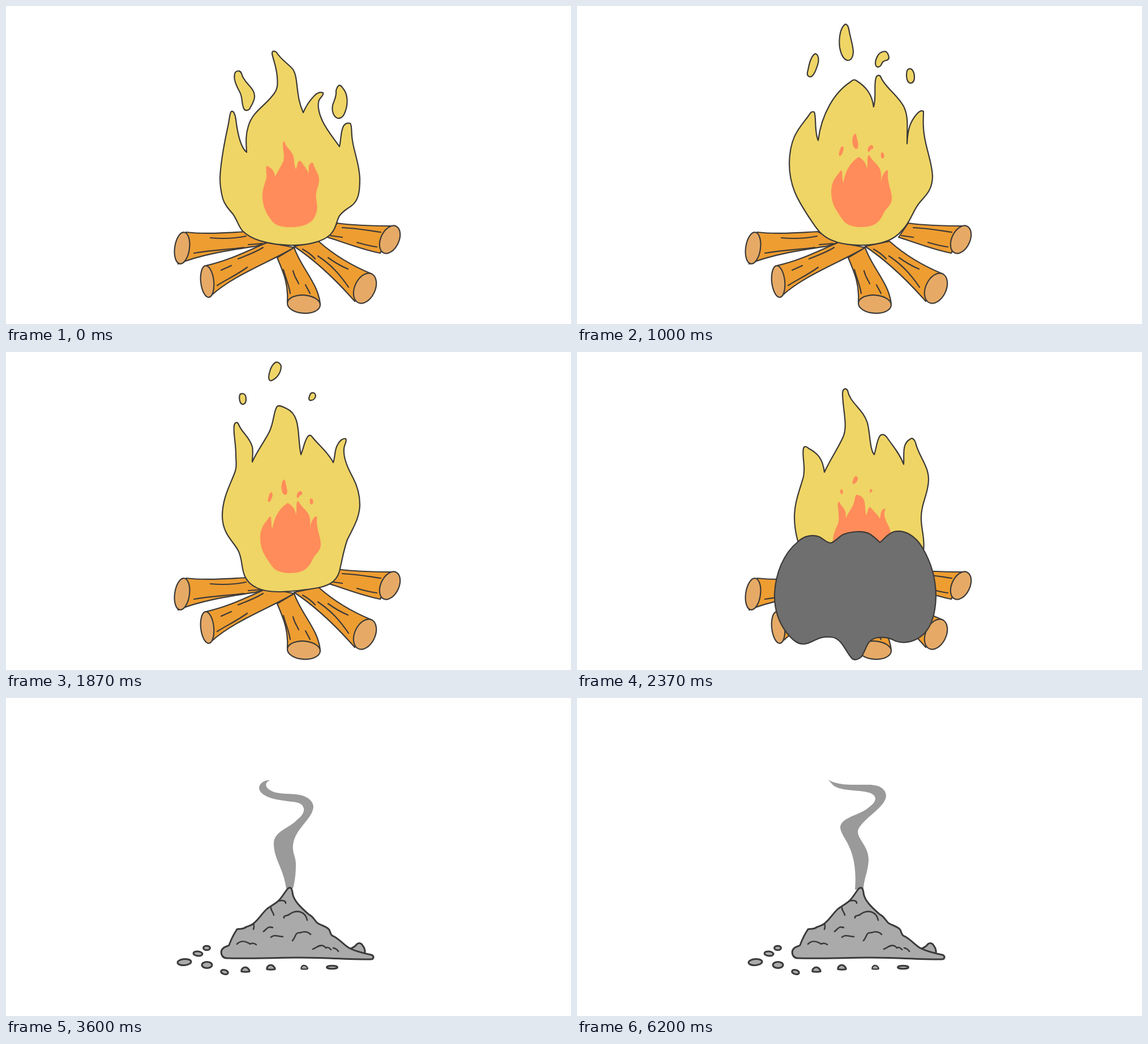
An HTML page without scripts that plays this animation: 998x561 px, repeating every 6.31 s.

```html
<!DOCTYPE html>
<html lang="en">
<head>
<meta charset="utf-8">
<title>Campfire to ash</title>
<style>
html, body { margin: 0; width: 100%; height: 100%; overflow: hidden; background: #fff; }
svg { display: block; width: 998px; height: 561px; overflow: hidden; }
.ink { stroke: #3c3a38; stroke-width: 2.2; stroke-linejoin: round; stroke-linecap: round; }
.fire, .ash, .strip, .puff, .smoke, .bit { animation: 6310ms linear infinite; }
.fire { animation-name: burn; animation-timing-function: step-end; }
.ash { animation-name: remain; animation-timing-function: step-end; }
.strip { animation-name: flicker; animation-timing-function: step-end; }
.inner .strip { animation-delay: -6279ms; }
.outer { fill: #efd565; }
.inner { fill: #ff8c5a; }
.wood { fill: #ee9d31; }
.cut { fill: #e6aa66; }
.line { fill: none; }
.heap { fill: #aaa; stroke: #3a3a3a; stroke-width: 3; stroke-linejoin: round; stroke-linecap: round; }
.cloud { fill: #6f6f6f; }
.cloud path { vector-effect: non-scaling-stroke; }
.puff { animation-name: puff; transform-origin: 491px 430px; }
.bit { animation-name: scatter; transform-origin: 491px 430px; }
.smoke { animation-name: drift; fill: #9a9a9a; }

@keyframes burn { 0% { visibility: visible } 39.7%, 100% { visibility: hidden } }
@keyframes remain { 0% { visibility: hidden } 39.7%, 100% { visibility: visible } }

/* The four flame poses stand side by side and slide into view */
@keyframes flicker {
  0%, 6.53%, 13.06%, 19.59%, 26.12%, 32.65%, 39.18% { transform: translateX(0) }
  1.63%, 8.16%, 14.69%, 21.22%, 27.75%, 34.28% { transform: translateX(-3000px) }
  3.26%, 9.79%, 16.32%, 22.85%, 29.38%, 35.91% { transform: translateX(-6000px) }
  4.9%, 11.43%, 17.95%, 24.48%, 31.01%, 37.54%, 99%, 100% { transform: translateX(-9000px) }
}
@keyframes puff {
  0%, 36.4% { transform: scale(.5); visibility: hidden }
  36.45% { transform: scale(.55); visibility: visible }
  37.5%, 38.05% { transform: none; visibility: visible }
  39.6%, 40.6% { transform: translate(8px, -140px) scale(2.05, 1.39); visibility: visible }
  40.65%, 100% { transform: translate(8px, -140px) scale(2.05, 1.39); visibility: hidden }
}
@keyframes scatter {
  0%, 40.6% { transform: scale(1); visibility: hidden }
  40.65% { transform: scale(1); visibility: visible }
  44% { transform: scale(.1); visibility: visible }
  44.1%, 100% { transform: scale(.1); visibility: hidden }
}
@keyframes drift {
  0%, 38.03%, 54.36%, 57.05%, 73.38%, 76.07%, 92.39%, 95.09% {
    d: path("M495,336 C490,300 473,285 473,256 C474,235 500,230 513,216 C523,208 527,202 526,195 C523,182 507,184 490,181 C465,178 447,170 447,158 C448,150 457,144 467,145 C458,148 458,155 462,159 C473,170 490,168 511,170 C530,171 543,181 543,192 C541,215 510,230 507,260 C506,275 512,280 512,294 C512,310 510,325 507,336Z") }
  40.1%, 59.11%, 78.13%, 97.15% {
    d: path("M491,338 C491,270 468,258 467,236 C468,222 495,213 509,203 C520,195 527,188 527,181 C525,169 505,169 485,168 C463,167 450,161 446,154 C444,150 444,147 446,146 C447,151 452,153 459,154 C473,158 490,156 510,156 C532,156 544,165 544,180 C541,200 500,220 499,243 C500,258 512,265 513,285 C513,305 507,320 506,338Z") }
  41.2%, 60.22%, 79.24%, 98.26%, 100% {
    d: path("M491,338 C497,262 466,248 465,228 C466,212 495,207 510,197 C521,189 527,184 527,177 C525,165 507,165 487,163 C465,161 455,158 449,150 C446,147 445,145 444,144 C448,147 453,149 459,150 C473,154 490,153 512,153 C535,152 546,161 546,173 C544,195 500,215 496,235 C496,250 514,260 515,284 C515,305 506,320 506,338Z") }
  47.54%, 48.65%, 66.56%, 67.67%, 85.58%, 86.69% {
    d: path("M493,338 C497,258 470,240 471,218 C473,203 500,200 514,191 C527,184 533,178 533,171 C531,160 511,160 491,157 C470,155 458,152 452,146 C449,144 448,143 447,142 C452,143 457,145 463,146 C477,149 496,147 518,146 C542,146 554,155 554,167 C550,188 505,205 502,226 C502,243 518,255 518,280 C517,305 507,320 506,338Z") }
}
</style>
</head>
<body>
<svg viewBox="0 0 998 561" xmlns="http://www.w3.org/2000/svg">
<defs>
  <g id="poses">
    <g>
      <path d="M502,422 C460,421 432,411 418,397 C410,388 408,376 400,366 C393,358 386,350 383,340 C379,325 378,316 378,304 C379,275 385,245 391,217 C395,200 395,188 398,186 C402,184 405,192 406,200 C409,225 415,250 425,258 C424,240 423,228 428,212 C436,186 455,178 470,159 C481,147 480,137 479,125 C478,108 472,95 470,84 C470,78 475,79 478,82 C486,95 500,103 507,112 C517,128 511,158 525,188 C530,176 538,165 545,158 C551,152 557,152 560,153 C562,157 556,160 553,166 C549,178 554,192 559,203 C567,220 581,236 589,248 C592,235 591,222 596,212 C599,207 604,206 608,207 C611,210 610,220 611,230 C613,255 624,275 625,305 C625,330 622,343 611,352 C602,358 592,364 588,372 C584,380 583,390 577,398 C567,414 535,423 502,422Z"/>
      <path d="M405,117 C409,113 414,114 416,119 C420,137 440,143 439,161 C438,170 433,176 430,182 C427,185 422,185 420,181 C415,169 419,162 412,150 C407,141 400,127 405,117Z"/>
      <path d="M587,141 C590,138 593,142 595,145 C604,155 604,172 600,184 C597,194 592,199 586,198 C579,196 575,186 577,175 C580,165 584,160 583,150 Q584,144 587,141Z"/>
    </g>
    <g transform="translate(3000)">
      <path d="M502,422 C470,422 445,415 430,400 C422,392 415,380 408,370 C392,345 375,320 375,277 C376,230 393,215 408,195 C412,189 414,185 419,187 C423,195 419,222 426,237 C432,190 455,152 483,134 C487,130 490,129 494,132 C510,142 521,155 524,178 C529,160 524,140 528,127 C530,121 535,121 537,126 C543,142 566,157 577,177 C586,195 583,215 583,243 C584,215 590,203 599,192 C603,187 608,183 612,186 C612,200 610,210 614,232 C618,256 628,280 628,302 C627,325 617,333 605,347 C592,363 590,380 574,396 C560,413 535,422 502,422Z"/>
      <path d="M421,84 C427,86 428,96 425,104 C422,113 419,122 413,125 C406,125 406,119 408,113 C410,103 413,88 421,84Z"/>
      <path d="M474,32 C480,33 480,42 482,50 C485,64 488,72 488,82 C487,92 484,96 478,96 C470,94 466,84 464,73 C462,57 465,38 474,32Z"/>
      <path d="M529,92 C532,84 538,80 545,80 C549,82 551,88 551,92 C549,97 545,95 541,98 C537,101 539,105 534,107 C526,110 526,100 529,92Z"/>
      <path d="M586,111 C592,109 596,117 596,125 C596,132 594,136 589,136 C584,136 582,128 582,122 C582,117 583,112 586,111Z"/>
    </g>
    <g transform="translate(6000)">
      <path d="M480,423 C450,423 430,413 422,396 C415,380 418,365 410,350 C401,333 383,322 382,290 C382,260 394,238 402,218 C409,203 406,195 406,180 C406,160 401,143 403,129 C405,123 409,123 411,128 C417,143 429,148 435,167 C437,178 435,185 435,194 C443,175 458,156 466,139 C474,120 473,103 479,96 C483,93 490,97 496,100 C522,112 514,150 521,181 C527,166 527,156 534,148 C537,146 539,147 541,150 C551,163 570,178 578,195 C582,183 580,172 586,163 C591,154 597,152 600,153 C603,157 598,162 597,170 C595,188 606,209 613,222 C621,237 625,252 625,270 C624,295 612,312 603,331 C597,347 594,365 589,387 C583,408 565,414 545,417 C525,420 505,423 480,423Z"/>
      <path d="M475,19 C479,16 484,19 486,25 C486,36 479,46 470,50 C463,53 463,43 466,34 C468,27 471,22 475,19Z"/>
      <path d="M414,74 C420,72 424,75 424,83 C424,90 421,93 417,92 C412,90 411,78 414,74Z"/>
      <path d="M540,72 C544,71 547,74 547,77 C546,82 543,85 540,85 C535,87 534,82 536,78 C537,74 538,73 540,72Z"/>
    </g>
    <path transform="translate(9000)" d="M498,422 C465,422 440,415 427,400 C415,385 385,350 384,292 C384,265 393,245 400,220 C404,200 397,185 400,170 C402,165 406,167 409,170 C424,178 434,187 437,212 C447,190 460,172 470,150 C479,130 469,100 469,72 C470,64 475,63 478,68 C482,90 505,100 513,125 C518,145 517,172 525,181 C530,165 529,158 535,148 C538,144 543,145 547,150 C557,165 569,177 577,198 C578,180 574,162 588,154 C592,150 596,154 598,160 C603,183 621,200 621,225 C621,250 607,268 608,295 C608,313 615,330 612,350 C607,378 595,395 583,402 C560,418 530,423 498,422Z"/>
  </g>
  <path id="blob" d="M390,335 C400,325 415,321 428,326 C436,330 440,336 448,337 C456,335 462,326 470,322 C485,316 505,315 517,321 C525,326 530,331 535,336 C543,330 549,320 560,317 C580,313 598,325 610,345 C625,370 634,400 634,432 C633,465 625,485 613,497 C600,510 580,516 563,510 C553,505 545,502 530,504 C510,508 512,525 502,538 C496,543 490,544 486,541 C475,530 468,505 450,503 C425,500 420,512 403,515 C390,517 380,507 370,495 C355,475 348,450 349,425 C351,390 365,355 390,335Z"/>
  <path id="pebble" d="M-7,3.5 C-8,0 -4,-4.5 0,-4 C4,-4 8,2 7,3.5 Q0,5 -7,3.5Z"/>
</defs>

<g class="fire ink">
  <g class="wood">
    <path d="M585,383 C620,388 655,388 684,388 L661,436 C630,430 600,418 568,408Z"/>
    <path d="M318,399 C352,403 385,400 425,398 L462,417 L440,424 C400,430 345,438 304,455Z"/>
    <path d="M479,444 C490,470 499,490 497,522 L555,526 C552,490 520,460 509,426Z"/>
    <path d="M509,424 C545,448 580,480 616,521 L647,473 C615,460 580,440 552,415Z"/>
    <path d="M353,458 C395,449 430,430 462,417 L509,426 C470,450 400,475 360,513Z"/>
  </g>
  <g class="cut">
    <ellipse cx="678" cy="412" rx="16" ry="26" transform="rotate(25 678 412)"/>
    <ellipse cx="311" cy="427" rx="13" ry="28" transform="rotate(8 311 427)"/>
    <ellipse cx="526" cy="526" rx="29" ry="16" transform="rotate(4 526 526)"/>
    <ellipse cx="634" cy="498" rx="18" ry="28" transform="rotate(25 634 498)"/>
    <ellipse cx="355.500" cy="486" rx="11.500" ry="28" transform="rotate(-6 355 486)"/>
  </g>
  <path class="line" d="M332,436 C365,430 390,430 420,426 M361,409 Q395,412 424,406 M428,421 L452,419
    M373,493 C390,482 405,476 426,461 M380,466 L398,458 M410,446 C425,440 440,435 454,426
    M490,465 C494,480 500,493 502,507 M507,467 C510,480 515,484 517,490 M529,492 L537,507
    M524,429 C533,434 540,439 546,446 M551,441 C575,457 590,474 605,496 M569,444 C580,452 592,459 604,464
    M594,391 C620,392 640,396 662,399 M573,405 L594,408 M620,417 Q640,423 655,425"/>
  <g class="outer"><g class="strip"><use href="#poses"/></g></g>
  <g class="inner" stroke="none" transform="translate(290.4 211.5) scale(.423)"><g class="strip"><use href="#poses"/></g></g>
</g>

<g class="ash">
  <path class="smoke" d="M495,336Z"/>
  <g class="heap">
    <path d="M606,443 C613,441 617,438 620,434 Q624,431 628,434 C632,439 635,443 634,451Z"/>
    <path d="M392,459 C380,460 377,447 384,441 C388,438 392,438 394,436 C398,425 404,414 408,408 C415,406 418,409 424,404 C429,402 432,402 437,398 C447,390 452,380 461,372 C470,365 478,362 483,356 C490,348 494,340 498,336 C503,333 505,336 506,343 C507,358 524,372 535,382 C541,384 545,392 550,397 C558,402 567,403 571,409 C574,415 573,419 580,421 C592,428 598,437 608,442 C620,448 635,451 645,453 C651,455 650,461 644,461 C600,461 560,458 520,458 C480,458 430,460 392,459Z"/>
    <path class="line" stroke-width="2.600" d="M482,358 C490,356 494,358 494,362 M468,370 C468,376 472,377 473,383 M437,398 Q439,403 437,408
      M491,388 C490,382 497,386 503,380 C515,373 529,377 532,392 M455,412 C461,407 463,402 471,405
      M408,434 C415,427 424,429 431,434 Q437,431 442,435 M468,422 C474,417 478,420 489,421
      M506,428 C512,422 510,413 520,414 C528,411 534,413 538,417
      M542,443 C549,440 554,435 560,437 Q563,438 565,441 Q569,438 574,444 M578,441 Q584,442 587,447"/>
    <ellipse cx="315" cy="466" rx="12" ry="5.500" transform="rotate(-4 315 466)"/>
    <ellipse cx="339" cy="451" rx="8" ry="4" transform="rotate(5 339 451)"/>
    <ellipse cx="354.500" cy="441" rx="6" ry="3.800"/>
    <ellipse cx="355" cy="471" rx="9" ry="5.500"/>
    <ellipse cx="386" cy="483.500" rx="6.500" ry="3.800" transform="rotate(15 386 483.5)"/>
    <ellipse cx="576" cy="475" rx="9.500" ry="2.800"/>
    <use href="#pebble" x="423" y="479"/>
    <use href="#pebble" x="468" y="475"/>
    <use href="#pebble" transform="translate(527 475) scale(.8)"/>
  </g>
</g>

<g class="cloud ink">
  <g class="puff"><use href="#blob"/></g>
  <g transform="translate(120 150) scale(.35)"><use class="bit" href="#blob"/></g>
  <g transform="translate(255 45) scale(.3)"><use class="bit" href="#blob"/></g>
  <g transform="translate(450 45) scale(.3)"><use class="bit" href="#blob"/></g>
  <g transform="translate(535 150) scale(.35)"><use class="bit" href="#blob"/></g>
</g>
</svg>
</body>
</html>
```
